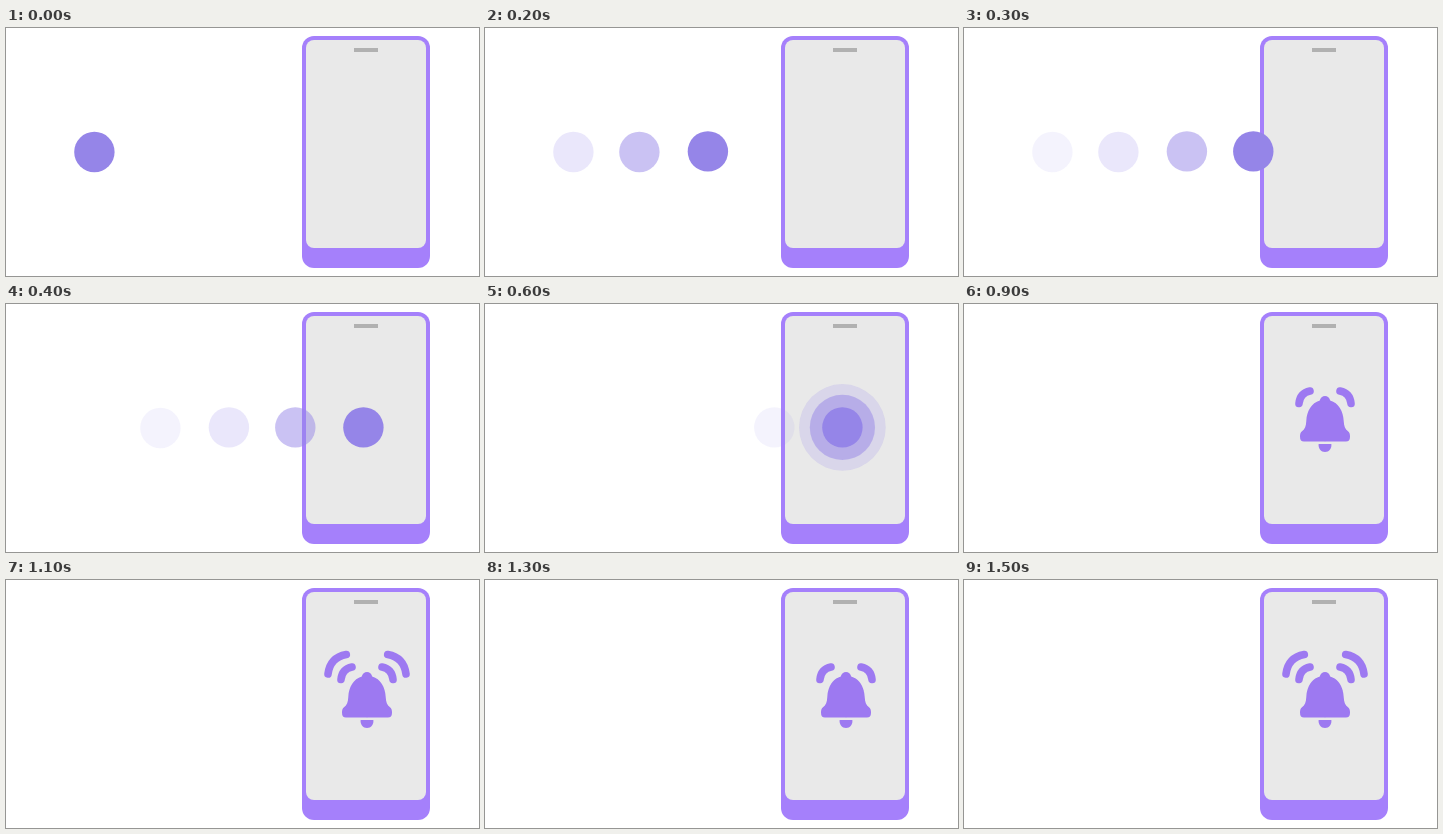
Write an HTML page that moves like this. It is 473 by 248 pixels and loops after 1.7 s.

```html
<!DOCTYPE html>
<html lang="en">
<head>
<meta charset="utf-8">
<style>
html, body { margin: 0; width: 100%; height: 100%; overflow: hidden; background: #fff; }
svg { display: block; }
</style>
</head>
<body>
<svg width="473" height="248" viewBox="0 0 473 248">
  <defs>
    <path id="half" d="M361.2 92C358.4 92 356.3 94 355.8 96.5C347.5 99 342.7 107 342.3 117C342 122 341 125 338 127.3C336.4 128.6 336 130.5 336 132.7C336 136 337.4 137.5 340 137.5H361.2Z"/>
    <path id="inner" d="M376 87Q386 89 387 99.5"/>
    <path id="outer" d="M381.7 74.5Q398 77.5 400 94"/>
  </defs>
  <g id="phone">
    <rect x="296" y="8" width="128" height="232" rx="12" fill="#a580fb"/>
    <rect x="300" y="12" width="120" height="208" rx="8" fill="#e9e9e9"/>
    <rect x="348" y="20" width="24" height="4" fill="#b1b1b1"/>
  </g>
  <g id="dots" fill="#9585e8"></g>
  <g id="bell" fill="#9d79f1">
    <use href="#half"/>
    <use href="#half" transform="matrix(-1 0 0 1 722 0)"/>
    <path d="M354.6 140H367.4C367.8 144.5 365 148 361 148S354.2 144.5 354.6 140Z"/>
    <g fill="none" stroke="#9d79f1" stroke-width="7.6" stroke-linecap="round">
      <g id="near"><use href="#inner"/><use href="#inner" transform="matrix(-1 0 0 1 722 0)"/></g>
      <g id="far"><use href="#outer"/><use href="#outer" transform="matrix(-1 0 0 1 722 0)"/></g>
    </g>
  </g>
</svg>
<script>
const byId = id => document.getElementById(id);
const show = (id, on) => byId(id).setAttribute('display', on ? 'inline' : 'none');
const stops = [[88.4, 124], [154.4, 124], [222.9, 123.4], [289.3, 123.4], [357.4, 123.4]];
const fade = [1, .5, .2, .1];
const circle = ([x, y], r, opacity) =>
  `<circle cx="${x}" cy="${y}" r="${r}" opacity="${opacity}"/>`;

function drawDots(step) {
  const last = stops.length - 1;
  let out = '';
  stops.forEach((p, i) => {
    const age = step - i;
    if (i < last && age >= 0 && age < fade.length) out += circle(p, 20.2, fade[age]);
  });
  if (step > 5) out += circle(stops[last], 43.3, .2);
  if (step > 4) out += circle(stops[last], 32.6, .5);
  if (step >= last) out += circle(stops[last], 20.2, 1);
  return out;
}

function draw(now) {
  const t = now % 1700;
  const ringing = t >= 800;
  byId('dots').innerHTML = ringing ? '' : drawDots(Math.min(6, Math.floor(t / 100)));
  byId('phone').setAttribute('transform', `translate(${ringing && t < 900 ? -.25 : 0} 0)`);
  show('bell', ringing);
  show('near', t >= 900);
  show('far', t >= 1500 || t >= 1100 && t < 1300);
  requestAnimationFrame(draw);
}
draw(0);
</script>
</body>
</html>
```
